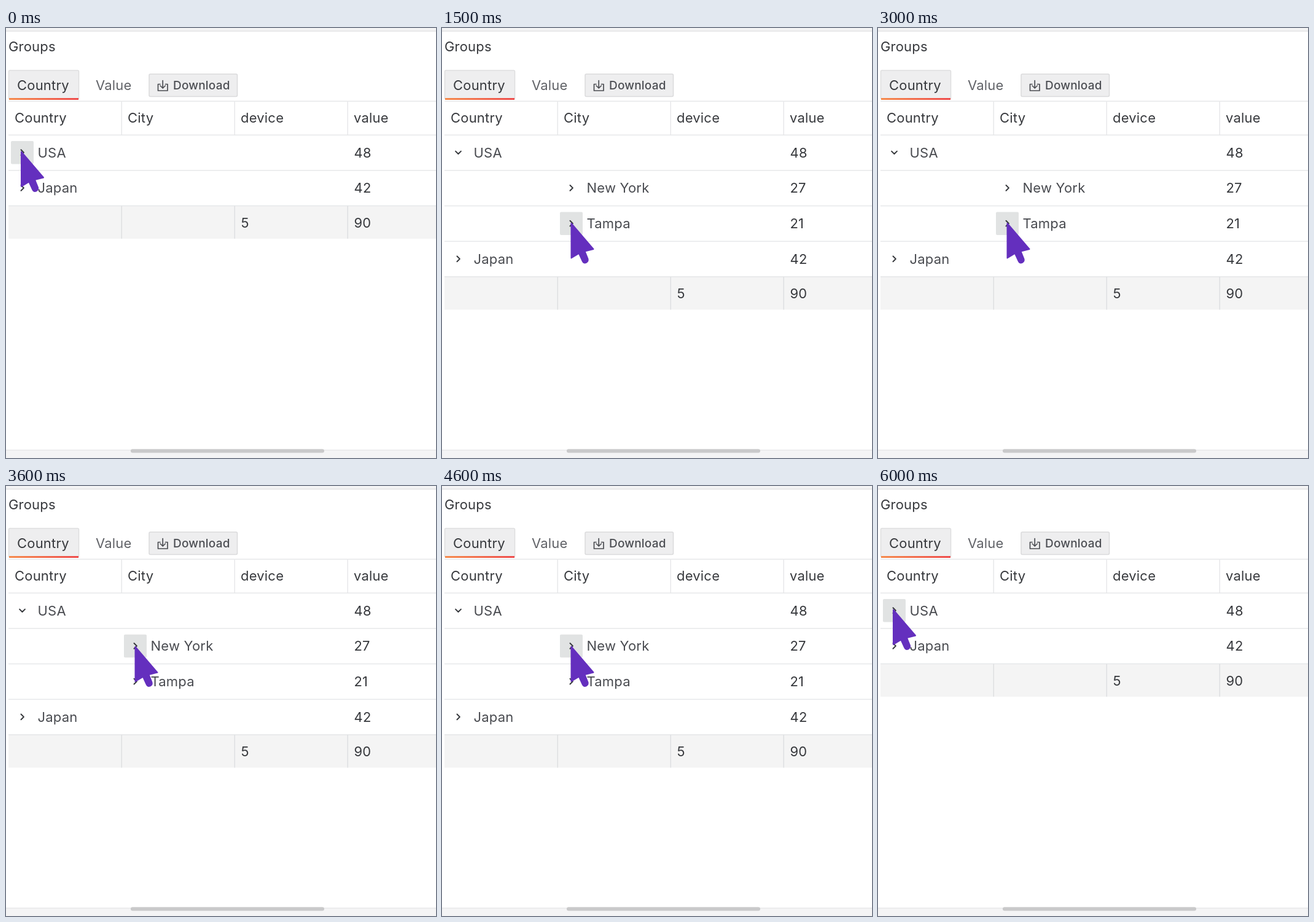
Animation of 700x700 px, one loop 6.2 s. Source, as an HTML page with a canvas:

```html
<!DOCTYPE html>
<html lang="en">
<head>
<meta charset="utf-8">
<title>Groups</title>
<style>
  html, body { margin: 0; height: 100%; overflow: hidden; background: #fff; }
  canvas { display: block; }
</style>
</head>
<body>
<canvas width="700" height="700"></canvas>
<script>
const ctx = document.querySelector('canvas').getContext('2d');
const LOOP = 6200, STEP = 100, ROW = 57.75, TOP = 174;
const COLUMNS = [4, 188, 372, 556];
const INK = '#37393d', LINE = '#e7e8ea';
const pointer = new Path2D('M1 2 L37 44 L23 47.5 L28 60 Q29 64 25 66 Q21 67.5 19 63 L13.5 51 L1 58.5 Z');

const USA = [24, 199.5], TAMPA = [209.5, 316], NEW_YORK = [209.5, 259.5];
const moves = [
  { start: 894, from: USA, to: TAMPA },
  { start: 3194, from: TAMPA, to: NEW_YORK },
  { start: 5223, from: NEW_YORK, to: USA },
];

// Critically damped spring
function spring(ms) {
  const x = Math.max(0, ms) / 50;
  return 1 - (1 + x) * Math.exp(-x);
}

function cursorAt(t) {
  const { start, from, to } = moves.findLast(m => t >= m.start) ?? moves[0];
  const p = spring(t - start);
  return from.map((v, i) => v + (to[i] - v) * p);
}

function rowsAt(t) {
  const within = (a, b) => t >= a && t < b;
  const group = (level, name, value, open) => ({ level, name, value, open });
  const device = (name, value) => ({ level: 2, name, value });
  const usa = within(200, 6000), tampa = within(1800, 3000), newYork = within(4000, 4600);
  const rows = [group(0, 'USA', 48, usa)];
  if (usa) {
    rows.push(group(1, 'New York', 27, newYork));
    if (newYork) rows.push(device('device 1', 12), device('device 1', 10), device('device 2', 5));
    rows.push(group(1, 'Tampa', 21, tampa));
    if (tampa) rows.push(device('device 3', 13), device('device 3', 8));
  }
  rows.push(group(0, 'Japan', 42, false));
  return rows;
}

function rect(x, y, w, h, color) {
  ctx.fillStyle = color;
  ctx.fillRect(x, y, w, h);
}

function rounded(x, y, w, h, r, fill, border) {
  ctx.beginPath();
  ctx.roundRect(x, y, w, h, r);
  ctx.fillStyle = fill;
  ctx.fill();
  if (border) {
    ctx.strokeStyle = border;
    ctx.lineWidth = 1.5;
    ctx.stroke();
  }
}

function text(str, x, middle, color = INK, font = '400 22px') {
  ctx.font = `${font} Inter, sans-serif`;
  ctx.letterSpacing = '0.2px';
  ctx.fillStyle = color;
  ctx.fillText(str, x, middle + 7.3);
}

function stroke(path, color, width) {
  ctx.strokeStyle = color;
  ctx.lineWidth = width;
  ctx.stroke(new Path2D(path));
}

function dividers(y, h, color = LINE) {
  for (const x of COLUMNS.slice(1)) rect(x - 0.5, y, 1.5, h, color);
}

function drawChrome() {
  rect(0, 0, 700, 700, '#fff');
  rect(0, 0, 700, 4, '#f4f4f5');
  rect(0, 4, 700, 2, '#e8e8e9');
  rect(0, 687, 700, 13, '#f4f4f5');
  rect(0, 686.5, 700, 1.5, '#e8e8e9');
  rounded(203, 685.5, 315, 6, 3, '#c9c9ca');
  text('Groups', 4, 31);

  rounded(4.5, 69, 114, 47, 2, '#eeeeef', '#dededf');
  const accent = ctx.createLinearGradient(5, 0, 118, 0);
  accent.addColorStop(0, '#f58a4b');
  accent.addColorStop(1, '#ee4b4b');
  rect(5, 114, 113, 3, accent);
  text('Country', 18, 93.5);
  text('Value', 146, 93.5, '#606267');

  rounded(233, 75, 143.5, 36.5, 2, '#eeeeef', '#dadadc');
  stroke('M251 91.5H247.5V102H263V91.5H259.5 M255.2 85.5V97.5 M251.2 94L255.2 98L259.2 94', '#4c4e53', 1.7);
  text('Download', 272, 92.5, '#4c4e53', '500 19px');

  rect(4, 118.5, 696, 1.5, LINE);
  ['Country', 'City', 'device', 'value'].forEach((label, i) => text(label, COLUMNS[i] + 10, 147));
  dividers(119, 55);
  rect(4, 173.5, 696, 1.5, LINE);
}

function drawRow({ level, name, value, open }, y, [cx, cy]) {
  const middle = y + 29.3, left = COLUMNS[level];
  if (level === 2) {
    dividers(y, ROW);
    text(name, left + 10, middle);
  } else {
    const x = left + 22.5;
    if (Math.abs(cx - x) < 18.5 && Math.abs(cy - middle) < 18.5)
      rounded(x - 18.5, middle - 19.2, 37, 37.5, 2, '#e1e3e3');
    const m = middle - 0.7;
    stroke(open ? `M${x - 4.4} ${m - 2}l4.4 4.4 4.4-4.4` : `M${x - 2} ${m - 4.4}l4.4 4.4-4.4 4.4`, INK, 2);
    text(name, left + 47.5, middle, '#494b50');
  }
  text(value, 566.5, middle);
  rect(4, y + ROW - 0.7, 696, 1.5, LINE);
}

function draw(t) {
  const rows = rowsAt(t), cursor = cursorAt(t);
  ctx.lineCap = ctx.lineJoin = 'round';
  drawChrome();
  rows.forEach((row, i) => drawRow(row, TOP + i * ROW, cursor));

  const footer = TOP + rows.length * ROW;
  rect(4, footer, 696, 53.5, '#f4f4f4');
  rect(4, footer - 0.7, 696, 1.5, LINE);
  dividers(footer, 53.5, '#dedfe1');
  text(5, 382.5, footer + 27.7);
  text(90, 566.5, footer + 27.7);

  ctx.save();
  ctx.translate(...cursor);
  ctx.fillStyle = ctx.strokeStyle = '#642fbe';
  ctx.lineWidth = 2;
  ctx.fill(pointer);
  ctx.stroke(pointer);
  ctx.restore();
}

function tick() {
  const t = performance.now() % LOOP;
  draw(Math.floor(t / STEP) * STEP);
  requestAnimationFrame(tick);
}
tick();
</script>
</body>
</html>
```
